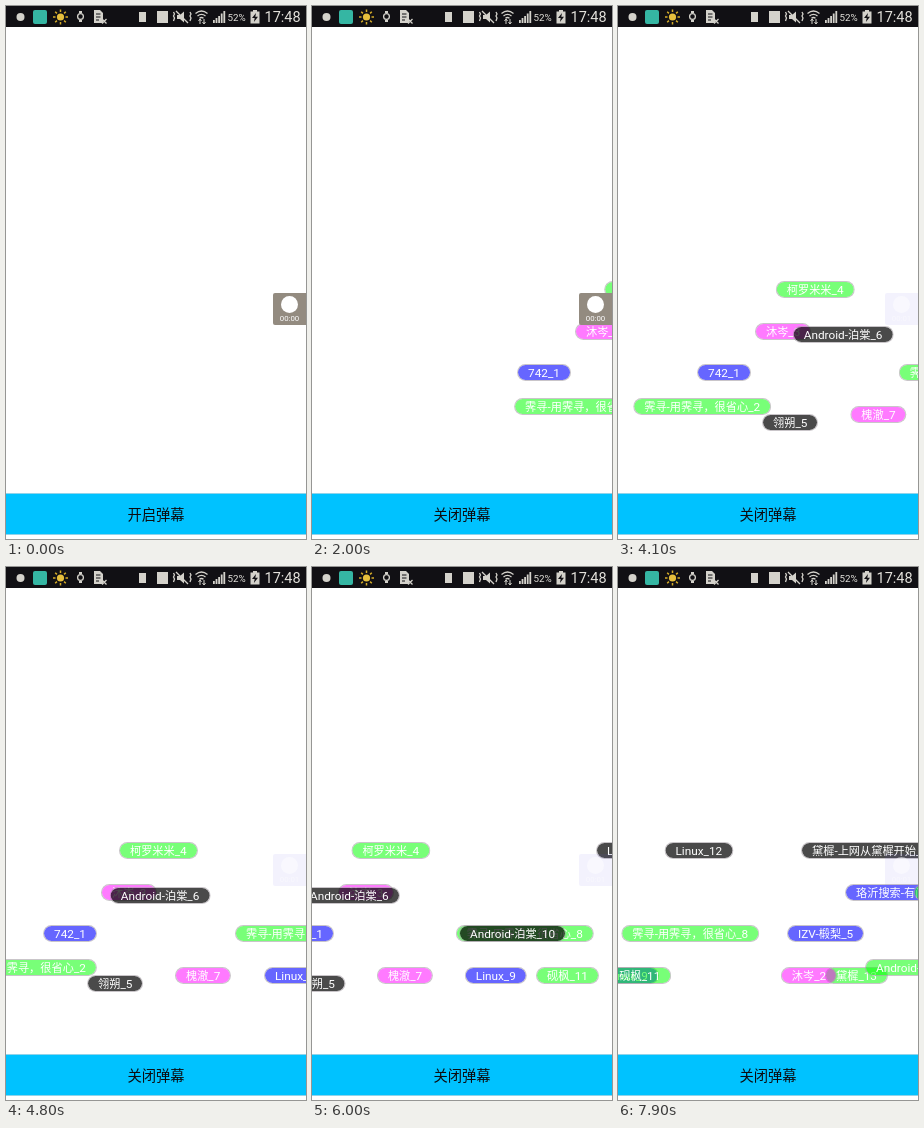
Recreate the animation shown at these times as an HTML page. Size 300 px wide and 533 px high, loop 8 s.

```html
<!DOCTYPE html>
<html lang="zh-CN">
<head>
<meta charset="utf-8">
<title>弹幕</title>
<style>
html, body { margin: 0; width: 100%; height: 100%; overflow: hidden; background: #fff; }
.stage {
  position: relative; width: 300px; height: 533px; overflow: hidden; background: #fff;
  font-family: Roboto, "Noto Sans CJK SC", "Noto Sans CJK", sans-serif;
}
.stage > * { position: absolute; }

.status { left: 0; top: 0; }
.status text { font-family: Roboto, sans-serif; fill: #e4e2dc; }

/* --s: entry time in seconds, --v: speed in px per second, --y: top edge */
.pill {
  left: 0; top: var(--y); height: 17px; padding: 0 10px; box-sizing: border-box;
  border: 1px solid rgba(165, 158, 165, .6); border-radius: 9px; background-clip: padding-box;
  font-size: 11.8px; line-height: 16px; color: #fff; white-space: nowrap;
  animation: slide 8s infinite;
}
.pill i { font-style: normal; font-size: 11.2px; }
.blue { background-color: rgba(0, 0, 255, .6); }
.green { background-color: rgba(0, 255, 0, .53); }
.pink { background-color: rgba(255, 0, 255, .52); }
.dark { background-color: rgba(0, 0, 0, .71); }

/* Ten picture changes per second, with a slight stall between 4.8 s and 6 s */
@keyframes slide {
  0% { transform: translateX(calc(300px + var(--v) * var(--s))); animation-timing-function: steps(48); }
  60% { transform: translateX(calc(300px + var(--v) * (var(--s) - 4.8))); animation-timing-function: steps(12); }
  75% { transform: translateX(calc(300px + var(--v) * (var(--s) - 5.95))); animation-timing-function: steps(20); }
  100% { transform: translateX(calc(300px + var(--v) * (var(--s) - 7.95))); }
}

.recorder {
  left: 267px; top: 287px; width: 33px; height: 32px; border-radius: 2px 0 0 2px;
  animation: fade 8s step-end infinite;
}
.recorder::before {
  content: ""; position: absolute; left: 8px; top: 3px; width: 17px; height: 17px;
  border-radius: 50%; background: currentColor;
}
.recorder span {
  position: absolute; left: 0; top: 21px; width: 33px;
  font-size: 7.8px; line-height: 9px; text-align: center;
}
.button {
  left: 0; top: 487px; width: 300px; height: 42px; box-sizing: border-box;
  border: solid #8fd3ea; border-width: 1px 0; background: #00c2ff;
}
.button span {
  position: absolute; left: 0; width: 100%; text-align: center;
  font-size: 14.3px; line-height: 43px; color: #0c0c10;
}
.before { animation: before 8s step-end infinite; }
.after { animation: after 8s step-end infinite; }
.zero { animation: zero 8s step-end infinite; }
.one { animation: one 8s step-end infinite; }
@keyframes before { 0% { opacity: 1; } 5%, 100% { opacity: 0; } }
@keyframes after { 0% { opacity: 0; } 5%, 100% { opacity: 1; } }
@keyframes zero { 0% { opacity: 1; } 32.5%, 100% { opacity: 0; } }
@keyframes one { 0% { opacity: 0; } 32.5%, 100% { opacity: 1; } }
@keyframes fade {
  0% { background: #938b80; color: #fff; }
  47.5%, 100% { background: rgba(100, 90, 220, .08); color: rgba(255, 255, 255, .5); }
}
</style>
</head>
<body>
<div class="stage">
  <svg class="status" width="300" height="21" viewBox="0 0 300 21">
    <rect width="300" height="21" fill="#111014"/>
    <circle cx="14.5" cy="11" r="4" fill="#d4d2cb"/>
    <rect x="27" y="4" width="14" height="14" rx="2" fill="#35b6a3"/>
    <g stroke="#d5ac28" stroke-width="1.5">
      <circle cx="54.5" cy="11" r="3.6" fill="#e6bf3c" stroke="none"/>
      <path d="M54.5 3.5v2.5M54.5 16v2.5M47 11h2.5M59.5 11h2.5M49.2 5.7l1.7 1.7M58.1 14.6l1.7 1.7M49.2 16.3l1.7-1.7M58.1 7.4l1.7-1.7"/>
    </g>
    <g fill="none" stroke="#d4d2cb" stroke-width="1.3">
      <circle cx="74.5" cy="10.5" r="2.9"/>
      <path d="M73 6h3M73 15h3" stroke-width="2"/>
      <path d="M170 5l12 12M167.5 6l1 2-1 2 1 2-1 3M184 6l1 2-1 2 1 2-1 3"/>
      <path d="M189.5 7.5q6-5 12 0M191.5 10q4-3.3 8 0M193.5 12.3q2-1.6 4 0"/>
      <path d="M194 13v5M192.5 15l1.5-2 1.5 2M198 13v5M196.5 16l1.5 2 1.5-2" stroke-width="1"/>
    </g>
    <path d="M88 4h6l3 3v10h-9z" fill="#d4d2cb"/>
    <path d="M90 8h4.500M90 11h4.500M90 14h3" stroke="#111014"/>
    <path d="M96 13l4.500 4.500M100.500 13l-4.500 4.500" stroke="#d4d2cb" stroke-width="1.300"/>
    <rect x="133" y="6" width="7" height="10" fill="#d4d2cb"/>
    <rect x="151" y="5" width="11" height="12" fill="#d4d2cb"/>
    <path d="M171 9h3l4-3.5v11l-4-3.5h-3z" fill="#d4d2cb"/>
    <path d="M207 17v-3h1.8v3zM209.6 17v-5h1.8v5zM212.2 17v-7h1.8v7zM214.8 17v-9.5h1.8v9.5zM217.4 17v-12h1.8v12z" fill="#d4d2cb"/>
    <text x="221.5" y="14.5" font-size="9.8">52%</text>
    <path d="M244.5 5.500h2.500v-1.500h4v1.500h2.500v12h-9z" fill="#d4d2cb"/>
    <path d="M250 7l-4 5h2.700l-.8 4 4.100-5.300h-2.700z" fill="#111014"/>
    <text x="258.5" y="16" font-size="14.5">17:48</text>
  </svg>

  <div class="pill blue" style="--s:.417;--v:60px;--y:358px">742_1</div>
  <div class="pill green" style="--s:.9;--v:89px;--y:391.5px"><i>霁寻</i>-<i>用霁寻，很省心</i>_2</div>
  <div class="pill pink" style="--s:1.383;--v:60px;--y:316.5px"><i>沐岑</i>_3</div>
  <div class="pill green" style="--s:1.878;--v:64px;--y:275px"><i>柯罗米米</i>_4</div>
  <div class="pill dark" style="--s:2.367;--v:90px;--y:408px"><i>翎朔</i>_5</div>
  <div class="pill dark" style="--s:2.866;--v:101.5px;--y:319.5px">Android-<i>泊棠</i>_6</div>
  <div class="pill pink" style="--s:3.352;--v:90.5px;--y:400px"><i>槐澈</i>_7</div>
  <div class="pill green" style="--s:3.84;--v:74px;--y:358px"><i>霁寻</i>-<i>用霁寻，很省心</i>_8</div>
  <div class="pill blue" style="--s:4.341;--v:91.5px;--y:400px">Linux_9</div>
  <div class="pill dark" style="--s:4.837;--v:137.5px;--y:358px">Android-<i>泊棠</i>_10</div>
  <div class="pill green" style="--s:5.332;--v:123px;--y:400px"><i>砚枫</i>_11</div>
  <div class="pill dark" style="--s:5.822;--v:125px;--y:275px">Linux_12</div>
  <div class="pill green" style="--s:6.397;--v:64px;--y:400px"><i>黛樨</i>_13</div>
  <div class="pill pink" style="--s:6.359;--v:92px;--y:400px"><i>沐岑</i>_2</div>
  <div class="pill dark" style="--s:6.85;--v:117px;--y:275px"><i>黛樨</i>-<i>上网从黛樨开始</i>_14</div>
  <div class="pill blue" style="--s:6.85;--v:131px;--y:358px">IZV-<i>椴梨</i>_5</div>
  <div class="pill blue" style="--s:7.35;--v:146px;--y:316.5px"><i>珞沂搜索</i>-<i>有问就有答</i>_15</div>
  <div class="pill green" style="--s:7.35;--v:106px;--y:391.5px">Android-<i>泊棠</i>_6</div>
  <div class="pill green" style="--s:7.82;--v:140px;--y:316.5px"><i>槐澈</i>_16</div>

  <div class="recorder"><span class="zero">00:00</span><span class="one">00:01</span></div>
  <div class="button"><span class="before">开启弹幕</span><span class="after">关闭弹幕</span></div>
</div>
</body>
</html>
```
